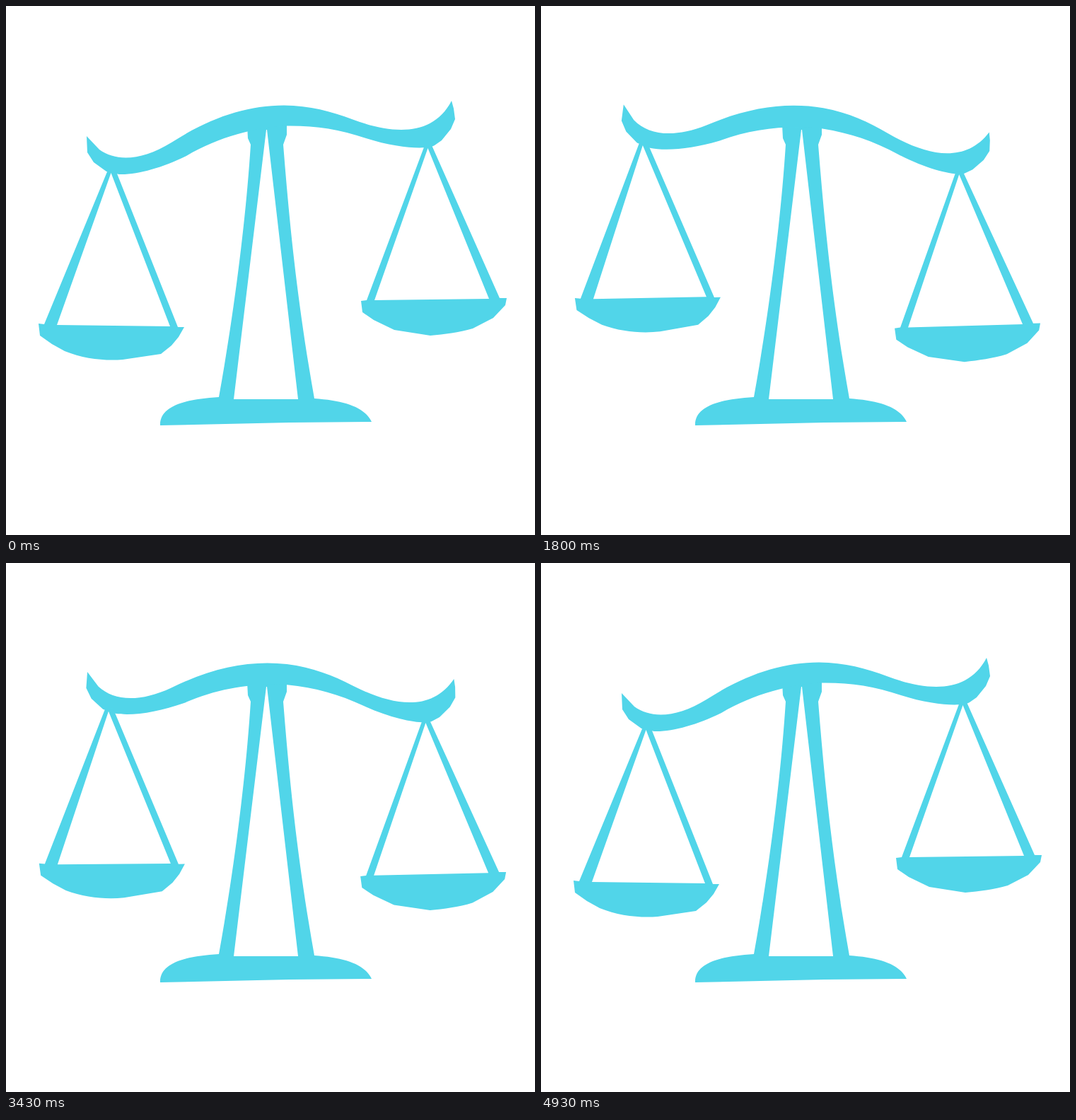
These frames come from a looping animation (748 px wide and 748 px high, 5010 ms). An HTML page:

```html
<!DOCTYPE html>
<html lang="en">
<head>
<meta charset="utf-8">
<title>Balance scales</title>
<style>
  html, body { margin: 0; width: 100%; height: 100%; overflow: hidden; background: #fff; }
  svg { display: block; width: 100%; height: 100%; fill: #51d5e9; }
</style>
</head>
<body>
<svg viewBox="0 0 748 748">
  <!-- stand -->
  <path fill-rule="evenodd" d="M341 168H397V182L392 196C401 310 412 420 436 555C480 558 508 568 517 588L400 589L218 593C217 567 250 556 301 553C325 420 340 290 346 196L342 187Z
    M368 175L322 556H413L369 175Z"/>
  <path id="beam" d="M114 184L132 203C157 221 193 218 234 193C290 157 340 141 393 140.5C430 141 460 149 489 160C545 181 603 186 630 134L633 145L635 160L629 174L616 190L606 197C597 203 556 202 509 187C470 174 437 169 397 169.5C355 171 300 185 255 212C220 229 185 239 160 238L142 234L124 221L115 207Z"/>
  <path id="left" d="M46 449L54 450L144 232H155L243 454H252L244 468L234 480L219 492L165 500C140 502 110 499 83 488L65 478L48 466Z
    M148.5 236L72 451L232 453Z" fill-rule="evenodd"/>
  <path id="right" d="M502 417L510 416L592 197H602L698 413H708L706 423L689 441L660 456C640 462 620 464 600 466L549 458L520 444L504 433Z
    M596.5 201L521 416L683 414Z" fill-rule="evenodd"/>
</svg>
<script>
  const LOOP = 5010, STEPS = 99;
  const [beam, left, right] = ["beam", "left", "right"].map(id => document.getElementById(id));

  const pose = (el, dx, dy, angle, cx, cy) =>
    el.setAttribute("transform", `translate(${dx} ${dy}) rotate(${angle} ${cx} ${cy})`);

  // Two steps per 100 ms, held for 30 and 70 ms
  const stepAt = t => Math.min(STEPS, 2 * Math.floor(t / 100) + (t % 100 >= 30 ? 1 : 0));

  function draw(now) {
    const phase = 2 * Math.PI * (stepAt(now % LOOP) + 2.3) / STEPS;
    const tilt = 5.59 - 5.65 * Math.cos(phase);
    const sway = 0.02 * tilt * tilt;
    pose(beam, 0, 0, tilt, 374, 178);
    pose(left, sway, -3.97 * tilt, -0.177 * tilt, 149, 452);
    pose(right, -sway, 3.76 * tilt, -0.09 * tilt, 605, 415);
  }

  const start = performance.now();
  function tick() {
    draw(performance.now() - start);
    requestAnimationFrame(tick);
  }
  tick();
</script>
</body>
</html>
```
